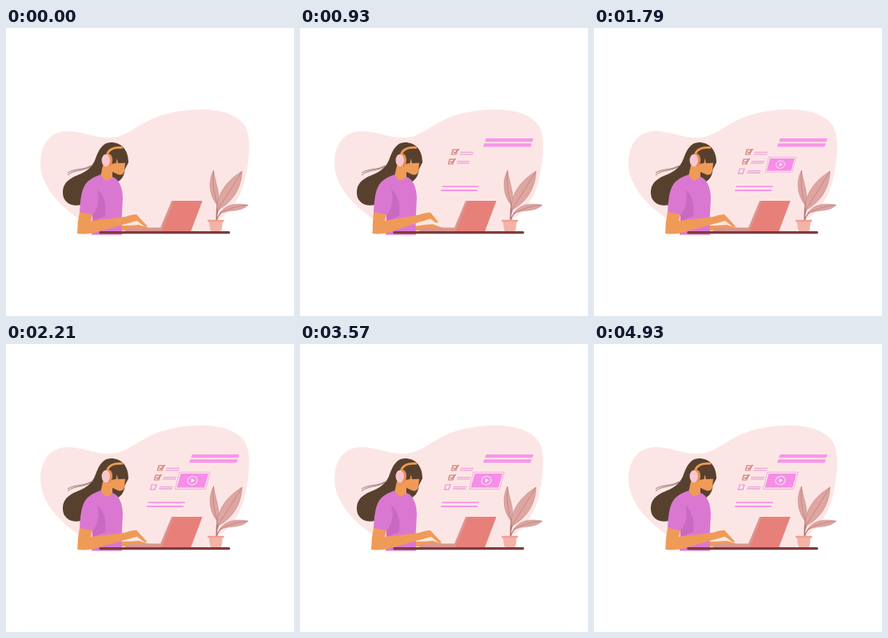
These frames come from a looping animation (360 px wide and 360 px high, 5 s). An HTML page:

```html
<!DOCTYPE html>
<html lang="en">
<head>
<meta charset="utf-8">
<title>Online study</title>
<style>
html, body { margin: 0; height: 100%; overflow: hidden; background: #fff; }
svg { display: block; width: 100vw; height: 100vh; }
[data-grow], [data-pop] { transform-box: fill-box; }
[data-grow] { transform-origin: 0 50%; }
[data-pop] { transform-origin: 50% 50%; }
.bar { fill: #f796e8; }
.rule { fill: none; stroke: #eea3da; stroke-width: 1.3; }
.box { fill: none; stroke: #d2827b; stroke-width: 1.2; }
.leaf { fill: #dea5a1; stroke: #b67c79; stroke-width: .5; }
.vein { fill: none; stroke: #b27571; stroke-width: .6; }
.skin { fill: #f09a58; }
.hair { fill: #57412e; }
</style>
</head>
<body>
<svg viewBox="0 0 360 360">
  <path fill="#fce6e5" d="M43 169C43 145 56 129 76 129C97 129 111 138 131 137C157 136 169 112 211 105C249 98 286 102 299 123C307 137 304 166 299 188C294 211 283 228 264 241L252 254H118C87 240 43 207 43 169Z"/>

  <!-- Floating page -->
  <path class="bar" data-grow="0 5" d="M232.6 138h59.2l-1.5 4.2h-59.2z"/>
  <path class="bar" data-grow="5 10" d="M230.4 144.2h59.4l-1.6 4.4h-59.4z"/>
  <path class="bar" data-grow="7 13" d="M178 197.3h46l-.6 1.8h-46z"/>
  <path class="bar" data-grow="1 8" d="M176.4 202.1h45.8l-.6 1.8h-45.8z"/>
  <g data-pop="1 6">
    <path class="box" d="M191 152.2h6l-2 5.8h-5.5z"/>
    <path class="box" d="M191.5 154.3l2 2 5.3-5"/>
  </g>
  <path class="rule" data-grow="3 8" d="M200.5 155.4h16.5M199.7 157.8h16.5"/>
  <g data-pop="8 13">
    <path class="box" d="M187 164.2h6l-2 5.8h-5.5z"/>
    <path class="box" d="M187.5 166.3l2 2 5.3-5"/>
  </g>
  <path class="rule" data-grow="9 14" d="M196.7 166.6h16.5M195.9 168.9h16.5"/>
  <path class="box" style="stroke:#ec92e0" data-pop="13 18" d="M182 176h6l-2 5.8h-5.5z"/>
  <path class="rule" data-grow="14 19" d="M192 178.7h16.5M191.2 181h16.5"/>
  <g data-pop="19 27">
    <path d="M216.7 160.2h38.5l-5.6 21.2h-38.2z" fill="#fce6e5" stroke="#ef9fdf" stroke-width=".8"/>
    <path d="M218.4 162h34.6l-4.8 17.6h-34.6z" fill="#f58ee7"/>
    <ellipse cx="233" cy="170.7" rx="6.1" ry="5.2" fill="none" stroke="#fde3f5" transform="rotate(-20 233 170.7)"/>
    <path d="M231.8 167.8l4.6 2.7-5.2 3z" fill="#fde3f5"/>
  </g>

  <!-- Plant -->
  <path class="vein" style="stroke-width:1.3" d="M263 241Q263 228 264.5 217M263 241Q263 231 267 223M263 241Q265 233 274 226"/>
  <path class="leaf" d="M259.5 178C253 190 253 208 264.5 222C268.5 205 262 197 259.5 178Z"/>
  <path class="leaf" d="M295 179C277 190 263 207 264 228C281 219 294 203 295 179Z"/>
  <path class="leaf" d="M302.5 221.3C290 219 275 219 267 232C280 226 293 231 302.5 221.3Z"/>
  <path class="vein" d="M259.5 178Q257 200 264.5 222M295 179Q281 202 264 228M302.5 221.3Q282 223 267 232"/>
  <path fill="#f5b3a8" d="M253.5 241h17.5l-1.4 11q-.4 2.5-3 2.5h-8.6q-2.6 0-3-2.5z"/>
  <path fill="#ef9f94" d="M252 239.8h20.5v2.4H252z"/>

  <!-- Hair and head -->
  <path class="hair" d="M131 143C121 143 116 152 112 163C106 180 92 182 83 187C74 192 71 198 71 206C71 218 82 224 94 221C97 207 108 198 121 190L133 196C143 192 148 186 148.5 177L153 168C153 153 145 143 131 143Z"/>
  <path fill="none" stroke="#8a5f5b" stroke-width=".8" d="M77 184C86 176 98 180 109 171M77 181C87 175 97 178 106 172"/>
  <path class="skin" d="M121 172H133V188L127 194L118 186Z"/>
  <path class="skin" d="M131 163H149.5L148 179Q146 185 140 183L131 179Z"/>
  <path class="hair" d="M128 148Q147 144 153 168.5L140 169L138.5 163L137.5 169L131 170Z"/>
  <path fill="none" stroke="#ef9b55" stroke-width="2.6" d="M126 160Q128 148 146 149.5"/>
  <ellipse cx="127.8" cy="165" rx="5.3" ry="8" fill="#e98e53"/>
  <ellipse cx="124.8" cy="165.5" rx="5.2" ry="7.8" fill="#f6c7cf"/>

  <!-- Far hand, laptop and desk -->
  <path id="farHand" class="skin"/>
  <path fill="#dc958e" d="M153 249.5H196V254.5H148Z"/>
  <path fill="#dc958e" d="M207 216H213L198 254.5H191Z"/>
  <path fill="#e8807a" d="M210 216H245.5L231 254.5H194.5Z"/>

  <!-- Shirt -->
  <path fill="#da78d1" d="M119 183C121 190 126 194 133 186C142 189 146 201 146 213L144.5 241L145 258.5H107L108 234L92 230.5C93 214 94 200 102 192Q109 186 119 183Z"/>
  <path fill="#c969c1" d="M114 201Q127 213 124 235L109 241L108 234Q119 221 114 201Z"/>
  <path fill="none" stroke="#7d3b3c" stroke-width="3.3" stroke-linecap="round" d="M118 255.6H278.5"/>
  <path id="arm" class="skin"/>
</svg>
<script>
const FRAMES = 70, LOOP = 5000;
const arm = document.getElementById('arm');
const farHand = document.getElementById('farHand');
const parts = [...document.querySelectorAll('[data-grow], [data-pop]')].map(el => {
  const [from, to] = (el.dataset.grow || el.dataset.pop).split(' ').map(Number);
  return { el, from, to, pop: 'pop' in el.dataset };
});

function progress(frame, from, to) {
  const p = Math.min(1, Math.max(0, (frame - from) / (to - from)));
  return p * (2 - p) * .45 + p * p * (3 - 2 * p) * .55;
}

function drawHands(lift) {
  const elbow = 89 + 2 * lift, top = 233 - 3 * lift;
  const tipX = 177 - 5 * lift, tipY = 248 - 6.5 * lift;
  arm.setAttribute('d', `M92 230L108 233L106 241L149 ${top + 3}Q157 ${top} 163 ${top}
    L${tipX} ${tipY}Q${tipX - 2} ${tipY + 1} ${tipX - 4} ${tipY}L${164 - lift} ${top + 8}
    Q157 ${top + 10} 149 ${top + 12}L108 256.5Q97 258 ${elbow} 257Q${elbow} 243 92 230Z`);
  farHand.setAttribute('d', `M144 ${247 + lift}Q156 ${247 - 2 * lift} 166 ${246 - lift}
    L179 250L165 250L155 253H144Z`);
}

function draw(now) {
  const frame = Math.floor((now % LOOP + 4) * FRAMES / LOOP) % FRAMES;
  for (const { el, from, to, pop } of parts) {
    const s = progress(frame, from, to);
    el.style.transform = pop ? `scale(${s})` : `scaleX(${s})`;
    el.style.visibility = s ? 'visible' : 'hidden';
  }
  drawHands(((1 - Math.cos(frame * Math.PI * 2 / 5)) / 2) ** 2);
}

const start = performance.now();
function tick() {
  draw(performance.now() - start);
  requestAnimationFrame(tick);
}
tick();
</script>
</body>
</html>
```
